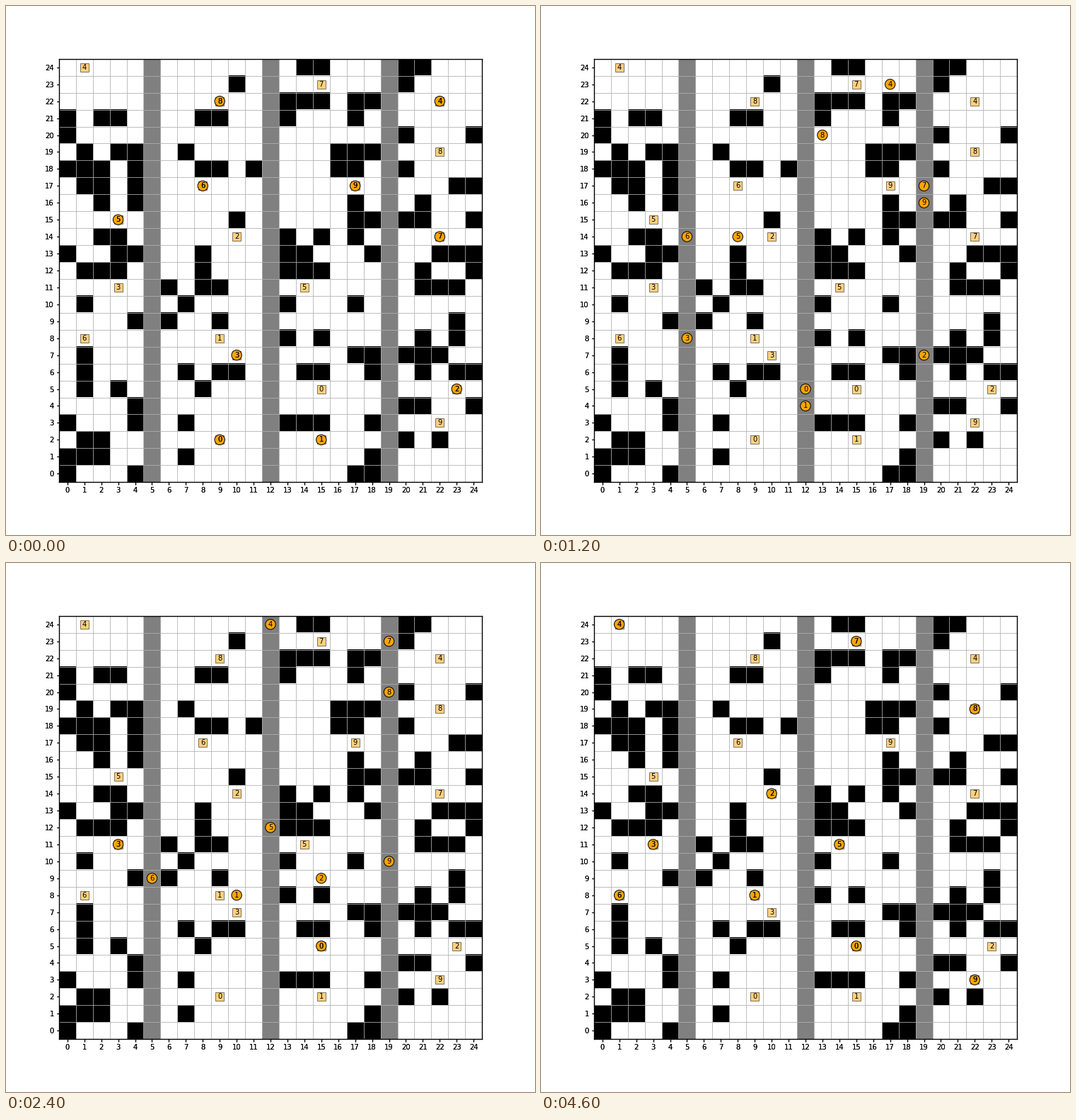
Recreate the animation shown at these times as a matplotlib script. Size 748x748 px, loop 4.7 s.

```python
import numpy as np
import matplotlib.pyplot as plt
from matplotlib.animation import FuncAnimation
from matplotlib.colors import ListedColormap
from matplotlib.patches import Circle, Rectangle

SIZE, DPI, N = 748, 72, 25
FRAMES, INTERVAL, FRAMES_PER_MOVE = 47, 100, 2

AISLES = (5, 12, 19)

# blocked columns of every row, bottom row first
BLOCKED = [
    (0, 4, 17, 18), (0, 1, 2, 7, 18), (1, 2, 20, 22),
    (0, 4, 7, 13, 14, 15, 18), (4, 20, 21, 24), (1, 3, 8),
    (1, 7, 9, 10, 14, 15, 18, 21, 23, 24), (1, 17, 18, 20, 21, 22),
    (13, 15, 21, 23), (4, 6, 9, 23), (1, 7, 13, 17),
    (6, 8, 9, 21, 22, 23), (1, 2, 3, 8, 13, 14, 15, 21, 24),
    (0, 3, 4, 8, 13, 14, 18, 22, 23, 24), (2, 3, 13, 15, 17),
    (10, 17, 18, 20, 21, 24), (2, 4, 17, 21), (1, 2, 4, 23, 24),
    (0, 1, 2, 4, 8, 9, 11, 16, 17, 20), (1, 3, 4, 7, 16, 17, 18),
    (0, 20, 24), (0, 2, 3, 8, 9, 13, 17), (13, 14, 15, 17, 18),
    (10, 20), (14, 15, 20, 21),
]

# start cell and moves of every agent (W waits one turn)
AGENTS = [
    ((9, 2), "RRR" + "UUU" + "RRR"),
    ((15, 2), "LLWL" + "U" * 6 + "LLL"),
    ((23, 5), "LLLL" + "UUUU" + "L" * 7 + "U" * 5 + "LL"),
    ((10, 7), "L" * 5 + "UUUU" + "LL"),
    ((22, 22), "LLLU" + "L" * 7 + "U" + "L" * 11),
    ((3, 15), "RRD" + "R" * 7 + "DDD" + "RR"),
    ((8, 17), "LLL" + "D" * 5 + "W" + "DDDD" + "LLLL"),
    ((22, 14), "LLL" + "U" * 9 + "LLLL"),
    ((9, 22), "RRRDD" + "R" * 7 + "D" + "RRR"),
    ((17, 17), "RRD" + "LWR" + "D" * 13 + "RRR"),
]
STEP = {"R": (1, 0), "L": (-1, 0), "U": (0, 1), "D": (0, -1), "W": (0, 0)}


def walk(start, moves):
    return np.cumsum([start] + [STEP[m] for m in moves], axis=0)


def position(path, t):
    turns = np.arange(len(path))
    return [np.interp(t, turns, path[:, axis]) for axis in (0, 1)]


def add_label(ax, x, y, text):
    return ax.text(x, y, text, ha="center", va="center", fontsize=10)


def style_axes(ax):
    ax.set(xlim=(-0.5, N - 0.5), ylim=(-0.5, N - 0.5),
           xticks=range(N), yticks=range(N))
    ax.tick_params(length=3.5, pad=3.5, width=1.2, labelsize=10)
    for spine in ax.spines.values():
        spine.set_linewidth(1.2)


plt.rcParams["font.family"] = "DejaVu Sans"
fig = plt.figure(figsize=(SIZE / DPI, SIZE / DPI), dpi=DPI, facecolor="white")
ax = fig.add_axes([0.1, 0.1, 0.8, 0.8])

cells = np.zeros((N, N))
cells[:, AISLES] = 1
for row, cols in enumerate(BLOCKED):
    cells[row, list(cols)] = 2
ax.imshow(cells, cmap=ListedColormap(["white", "gray", "black"]),
          origin="lower", interpolation="nearest", zorder=0)
style_axes(ax)

edges = np.arange(0.5, N - 1)
ax.set_xticks(edges, minor=True)
ax.set_yticks(edges, minor=True)
ax.tick_params(which="minor", length=0)
ax.grid(which="minor", color="#b0b0b0", linewidth=0.8)
ax.set_axisbelow(True)

# a second pass over the frame and tick labels makes them heavier
frame_ax = fig.add_axes(ax.get_position(), label="frame")
frame_ax.patch.set_visible(False)
style_axes(frame_ax)

paths = [walk(*agent) for agent in AGENTS]
for i, path in enumerate(paths):
    for x, y in (path[0], path[-1]):
        ax.add_patch(Rectangle((x - 0.25, y - 0.25), 0.5, 0.5,
                               facecolor="orange", edgecolor="black",
                               alpha=0.5, zorder=1))
        add_label(ax, x, y, i)

discs, names = [], []
for i, path in enumerate(paths):
    discs.append(ax.add_patch(Circle(path[0], 0.3, facecolor="orange",
                                     edgecolor="black", zorder=2)))
    names.append(add_label(ax, *path[0], i))


def update(frame):
    t = frame / FRAMES_PER_MOVE
    for path, disc, name in zip(paths, discs, names):
        x, y = position(path, t)
        disc.center = x, y
        name.set_position((x, y))
    return discs + names


anim = FuncAnimation(fig, update, frames=FRAMES, interval=INTERVAL,
                     repeat=True, repeat_delay=0, blit=False)
plt.show()
```
